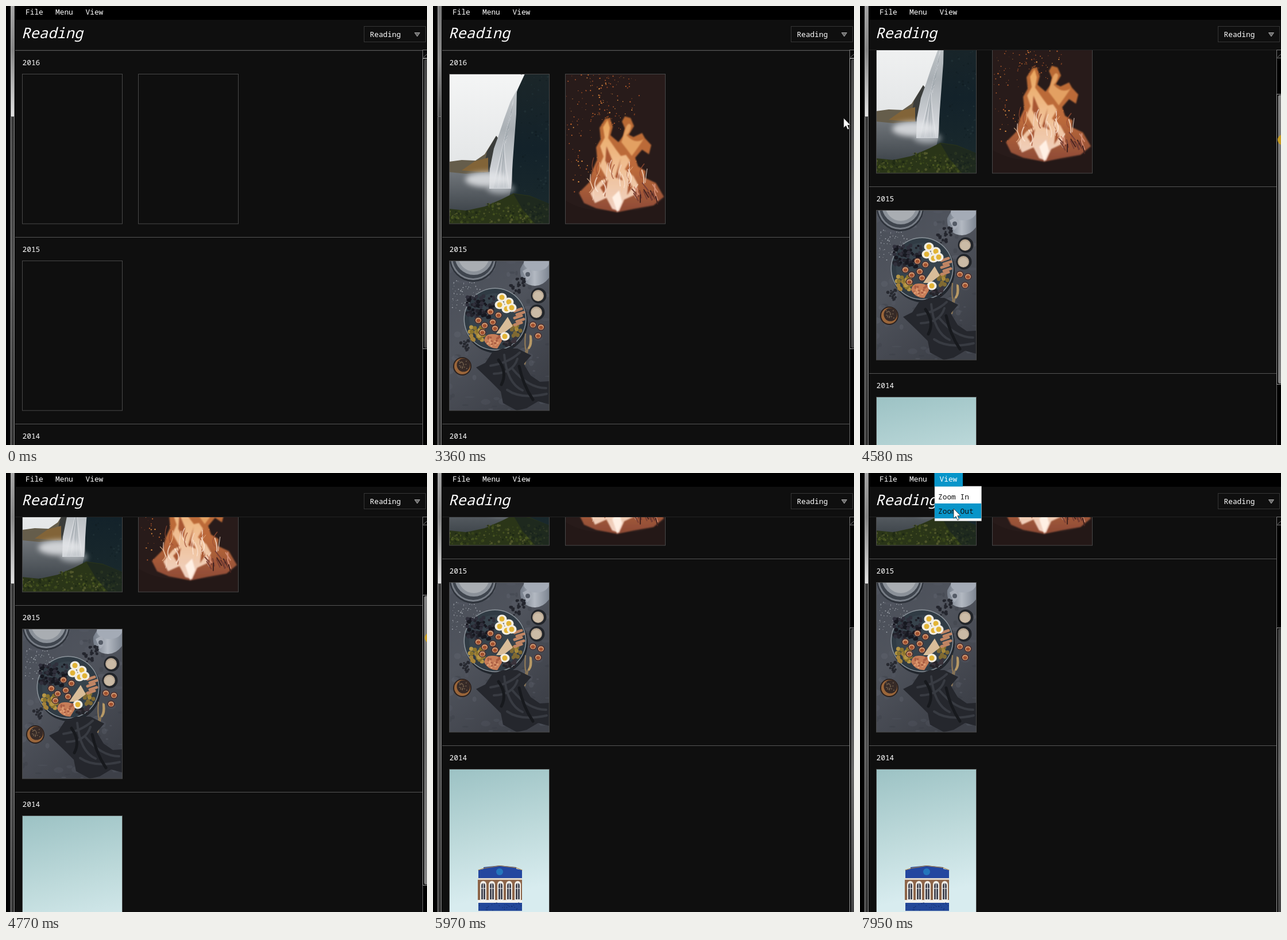
These frames come from a looping animation (733x764 px, 8 s). An HTML page:

```html
<!DOCTYPE html>
<html lang="en">
<head>
<meta charset="utf-8">
<title>Reading list</title>
<style>
  html, body { margin: 0; width: 100%; height: 100%; overflow: hidden; background: #000; }
  svg { display: block; width: 733px; height: 764px; }
  text { font: 12.83px "Noto Sans Mono", "DejaVu Sans Mono", monospace; fill: #fff; white-space: pre; }
  .title { font-size: 25.5px; font-style: italic; }
  .dark { fill: #111; }
</style>
</head>
<body>
<svg viewBox="0 0 733 764" xmlns="http://www.w3.org/2000/svg">
  <defs>
    <clipPath id="pane"><rect x="16" y="77" width="709" height="687"/></clipPath>
    <clipPath id="photo"><rect width="174" height="261"/></clipPath>
    <linearGradient id="sky" x2="0" y2="1"><stop stop-color="#f4f5f5"/><stop offset="1" stop-color="#d9dcde"/></linearGradient>
    <linearGradient id="cliff" x2="0" y2="1"><stop stop-color="#1b2629"/><stop offset=".5" stop-color="#13222a"/><stop offset="1" stop-color="#1b2a2d"/></linearGradient>
    <linearGradient id="lake" x2="0" y2="1"><stop stop-color="#72777c"/><stop offset="1" stop-color="#30373d"/></linearGradient>
    <linearGradient id="fall" x2="0" y2="1"><stop stop-color="#c5cacd"/><stop offset=".4" stop-color="#a9afb4"/><stop offset="1" stop-color="#dfe1e5"/></linearGradient>
    <linearGradient id="flame" x2="0" y2="1"><stop stop-color="#b96a33"/><stop offset=".55" stop-color="#bd6b3b"/><stop offset="1" stop-color="#8d4a36"/></linearGradient>
    <linearGradient id="core" x2="0" y2="1"><stop stop-color="#f0ad61"/><stop offset="1" stop-color="#fbe2d5"/></linearGradient>
    <linearGradient id="slate" x2=".6" y2="1"><stop stop-color="#4a4f59"/><stop offset=".45" stop-color="#50545d"/><stop offset="1" stop-color="#3d4048"/></linearGradient>
    <linearGradient id="jug"><stop stop-color="#737b87"/><stop offset=".5" stop-color="#b3b9c2"/><stop offset="1" stop-color="#7e8692"/></linearGradient>
    <linearGradient id="air" x2=".15" y2="1"><stop stop-color="#9cc2c4"/><stop offset=".5" stop-color="#bedadb"/><stop offset=".9" stop-color="#d8ecef"/></linearGradient>
    <linearGradient id="railLit" x2="0" y2="1"><stop stop-color="#a6a6a6"/><stop offset=".4" stop-color="#858585"/><stop offset="1" stop-color="#e2e2e2"/></linearGradient>
    <linearGradient id="railDim" x2="0" y2="1"><stop stop-color="#777"/><stop offset=".5" stop-color="#8a8a8a"/><stop offset="1" stop-color="#4c4c4c"/></linearGradient>
    <linearGradient id="railLow" x2="0" y2="1"><stop stop-color="#555"/><stop offset=".2" stop-color="#353535"/><stop offset=".62" stop-color="#505050"/><stop offset="1" stop-color="#333"/></linearGradient>
    <linearGradient id="thumbIdle" x2="0" y2="1"><stop stop-color="#444"/><stop offset=".5" stop-color="#686868"/><stop offset="1" stop-color="#444"/></linearGradient>
    <linearGradient id="thumbHot" x2="0" y2="1"><stop stop-color="#848484"/><stop offset=".5" stop-color="#6c6c6c"/><stop offset="1" stop-color="#848484"/></linearGradient>
    <filter id="soft" x="-50%" y="-50%" width="200%" height="200%"><feGaussianBlur stdDeviation="5"/></filter>
    <filter id="blur1"><feGaussianBlur stdDeviation="1"/></filter>
  </defs>

  <rect width="733" height="764" fill="#000"/>
  <rect x="16" y="24" width="717" height="740" fill="#0f0f0f"/>

  <g id="rail">
    <rect x="8" y="0" width="7" height="764" fill="url(#railLow)"/>
    <path d="M8.5 0V764" stroke="#aaa"/>
    <path d="M14.5 0V764" stroke="#858585"/>
    <rect id="railThumb" x="9" y="0" width="5" height="192"/>
    <path d="M8 192.5H15" stroke="#777"/>
  </g>

  <path d="M16 76.5H725" stroke="#232323"/>
  <g clip-path="url(#pane)"><g id="list"></g></g>

  <text x="34" y="15">File</text>
  <text x="86" y="15">Menu</text>
  <text class="title" x="27" y="56">Reading</text>
  <rect x="623.5" y="35.5" width="107" height="27" fill="#0f0f0f" stroke="#363636"/>
  <text x="633.5" y="54">Reading</text>
  <path d="M711.5 46.5H720.5L716 53Z" fill="#666" stroke="#aaa"/>

  <g id="scrollbar">
    <rect x="725" y="76" width="8" height="688" fill="#000"/>
    <path d="M725.5 76V764" stroke="#686868"/>
    <path d="M733 76.5H725.5V90.5H733" fill="#0b0b0b" stroke="#777"/>
    <path d="M727 89L734 83" stroke="#777" fill="none"/>
    <g id="thumb">
      <path d="M734 91.5H725.5V596.5H734" fill="#0a0a0a" stroke="#999"/>
      <rect id="grip" x="728" y="93" width="14" height="502" rx="3"/>
    </g>
  </g>

  <g id="menu">
    <rect x="130" y="23" width="81.5" height="60.5" fill="#fff" stroke="#999" stroke-width=".6"/>
    <rect id="hover" x="130" width="81" height="26" fill="#0895c9"/>
    <text class="dark" x="136" y="46">Zoom In</text>
    <text class="dark" x="136" y="71">Zoom Out</text>
  </g>
  <rect id="viewBg" x="129.5" y="0" width="49.5" height="23.5" fill="#0895c9"/>
  <text x="138.5" y="15">View</text>

  <circle id="press" r="9" fill="#c79d25"/>
  <path id="arrow" d="M0 0V17L4 13.4L6.8 20L9.6 18.8L6.9 12.4H12Z" fill="#fff" stroke="#222" stroke-width=".8"/>
</svg>
<script>
const LOOP = 8000;
const $ = id => document.getElementById(id);

let seed = 7;
const rnd = (a = 0, b = 1) => {
  seed = (seed * 16807) % 2147483647;
  return a + (b - a) * seed / 2147483647;
};
const n = v => v.toFixed(1);
const path = (d, fill, extra = "") => `<path d="${d}" fill="${fill}" ${extra}/>`;
const disc = (x, y, r, fill, extra = "") => `<circle cx="${n(x)}" cy="${n(y)}" r="${n(r)}" fill="${fill}" ${extra}/>`;
const oval = (x, y, rx, ry, fill, extra = "") => `<ellipse cx="${x}" cy="${y}" rx="${rx}" ry="${ry}" fill="${fill}" ${extra}/>`;
const box = (x, y, w, h, fill) => `<rect x="${x}" y="${y}" width="${w}" height="${h}" fill="${fill}"/>`;
const many = (count, make) => Array.from({ length: count }, (_, i) => make(i)).join("");
const pick = list => list[Math.floor(rnd(0, list.length))];
const line = (d, stroke, w, extra = "") => path(d, "none", `stroke="${stroke}" stroke-width="${w}" stroke-linecap="round" ${extra}`);

function waterfall() {
  const grass = "M0 235L30 238L62 231L92 218L112 208L140 212L174 226V261H0Z";
  return box(0, 0, 174, 261, "url(#sky)")
    + path("M0 153L22 150L46 151L62 140L72 124L82 108L90 118V185H0Z", "#655d4b")
    + path("M66 135L82 108L90 118V175H58Z", "#3b3d3b")
    + path("M22 168L45 152L68 146V172Z", "#826438")
    + path("M0 171L30 174L110 168V261H0Z", "url(#lake)")
    + path("M132 0H174V261H95L110 190V60L119 28Z", "url(#cliff)")
    + many(70, () => disc(rnd(122, 174), rnd(0, 210), rnd(.6, 2), pick(["#101c21", "#25353a"]), 'opacity=".6"'))
    + path("M118 28L107 48L96 78L87 105L78 130L71 165L70 200H108L111 150L114 110L117 70Z", "url(#fall)")
    + many(26, i => line(`M${n(112 - i * .5)} ${n(45 + i * 3)}Q${n(98 - i * .3)} 110 ${n(75 + i * 1.2)} 198`, pick(["#eef0f2", "#8f989f"]), .8, 'opacity=".4"'))
    + oval(66, 184, 38, 13, "#e2e4e7", 'filter="url(#soft)" opacity=".85"')
    + oval(90, 200, 24, 9, "#c2c7cc", 'filter="url(#soft)" opacity=".7"')
    + path(grass, "#2a3518")
    + many(190, () => {
        const x = rnd(0, 174);
        return disc(x, rnd(x < 60 ? 239 : 226, 259), rnd(.8, 2.6), pick(["#4c5a22", "#1b2613", "#39471b", "#5c6130"]), 'opacity=".75"');
      })
    + path("M112 209L140 213L174 226V261H150L128 236Z", "#152024", 'opacity=".55"');
}

function fire() {
  const ember = ["#c7672d", "#e79445", "#8d4524", "#a8552c"];
  return box(0, 0, 174, 261, "#281b1a")
    + many(150, () => disc(rnd(0, 1) * rnd(60, 145), rnd(0, 215), rnd(.4, 1.2), pick(ember)))
    + many(70, () => disc(rnd(35, 118), rnd(0, 90), rnd(.4, 1.2), pick(ember)))
    + path("M0 220Q25 236 60 238H125Q160 232 174 216V261H0Z", "#241817")
    + path("M24 207L42 189L48 167L56 149L54 128L62 114L60 94L70 78L78 77L83 92L79 107L93 119L101 108L104 95L99 83L104 74L114 77L120 91L111 106L119 110L134 103L139 112L150 124L146 140L134 132L122 146L127 161L140 169L139 181L158 190L172 214L154 229L120 235L91 241L54 234L33 225Z", "url(#flame)", 'filter="url(#blur1)"')
    + path("M106 93Q111 83 115 90Q114 101 107 107Q123 124 137 113Q126 130 116 143L108 132L98 119Z", "#e3a062", 'filter="url(#blur1)"')
    + path("M66 93L74 80L78 94L75 112L88 131L97 143L106 141L113 151L104 166L119 178L127 193L120 211L103 219L94 239L82 235L72 216L52 225L44 208L60 188L72 181L60 160L67 144L61 126L69 111Z", "url(#core)", 'filter="url(#blur1)" opacity=".9"')
    + path("M72 126L82 150L79 168L70 151ZM97 147L92 171L101 186L87 180ZM61 198L75 184L68 209ZM111 184L117 197L108 211Z", "#a85631", 'filter="url(#blur1)"')
    + many(28, () => {
        const x = rnd(40, 142), y = rnd(170, 220);
        return line(`M${n(x)} ${n(y)}q${n(rnd(-12, 12))} -9 ${n(rnd(-6, 6))} -24`, pick(["#ffe9da", "#f4c79e", "#9f5136", "#f7d8c6"]), rnd(.8, 2.6).toFixed(1), 'opacity=".7"');
      })
    + many(18, () => {
        const x = rnd(124, 164), y = rnd(200, 227);
        return line(`M${n(x)} ${n(y)}l${n(rnd(-12, 2))} -13`, pick(["#44231f", "#d18a70", "#7b4035"]), 2);
      })
    + path("M82 215L91 241L99 222L94 203Z", "#fff0e4", 'filter="url(#blur1)"');
}

const cup = (x, y) => disc(x, y, 13.5, "#22252a") + disc(x - 1, y, 10, "#baa893") + disc(x - 1, y + 1, 8, "#cbbba6");
const fig = (x, y) => oval(x, y, 6.5, 6, "#4b2b2c") + oval(x, y, 5, 4.5, "#d2a078") + oval(x, y + .5, 3.5, 3, "#a2502f");
const egg = (x, y) => oval(x, y, 8.5, 7.5, "#f3eee2") + disc(x, y, 4.5, "#e2b436");

function breakfast() {
  const figs = [[51, 104], [62, 113], [76, 107], [58, 125], [86, 95], [72, 89], [80, 118], [160, 116], [155, 131], [146, 112]];
  const eggs = [[92, 64], [104, 72], [88, 77], [100, 84], [97, 132], [109, 82]];
  return box(0, 0, 174, 261, "url(#slate)")
    + many(110, () => oval(n(rnd(0, 174)), n(rnd(0, 261)), n(rnd(2, 9)), n(rnd(1, 6)), pick(["#6a707a", "#343840", "#5b606a"]), 'opacity=".25"'))
    + many(70, () => disc(rnd(5, 55), rnd(35, 90), rnd(.4, 1), "#9ba0a8"))
    + disc(42, -4, 41, "#2e333b") + disc(42, -5, 39, "#777d86") + disc(42, -5, 36, "#3f454e")
    + disc(43, -8, 33, "#8b9199") + disc(43, -8, 27, "#a9adb2")
    + path("M124 14Q130 3 134 -2H174V30Q160 49 139 42Q122 35 124 14Z", "url(#jug)")
    + oval(152, 4, 22, 14, "#a4abb6") + path("M128 18L139 12L144 27L136 35Z", "#a7adb7")
    + disc(137, 24, 4, "#555c67")
    + many(22, () => disc(rnd(106, 132), rnd(31, 58), rnd(1.5, 3), "#24262e"))
    + cup(156, 61) + cup(153, 90)
    + disc(82, 106, 55, "#22272e") + disc(80, 102, 54.5, "#8c949b") + disc(80, 102, 53, "#303b44") + disc(80, 102, 45, "#37434c")
    + many(75, () => disc(rnd(31, 79), rnd(62, 99), rnd(2, 3.6), pick(["#23232c", "#30303c", "#171820"])))
    + many(22, () => disc(rnd(35, 60), rnd(116, 138), 3.6, pick(["#a4823a", "#8b752d", "#b69746"])))
    + many(12, () => disc(rnd(108, 125), rnd(112, 134), 3.6, pick(["#a78838", "#806a32"])))
    + many(25, () => disc(rnd(90, 118), rnd(134, 148), 2.5, pick(["#25242a", "#3a333b"])))
    + path("M82 127L102 98L111 114L94 127Z", "#d9bd99")
    + many(5, i => line(`M${114 + i % 2 * 4} ${88 + i * 6}l12 -4`, pick(["#a95c43", "#c08564"]), 5))
    + figs.map(p => fig(...p)).join("") + eggs.map(p => egg(...p)).join("")
    + path("M61 139Q63 127 75 128Q90 127 92 140L84 153Q68 153 61 139Z", "#c77d58")
    + many(24, () => disc(rnd(66, 88), rnd(131, 150), 2, pick(["#dd9a70", "#a95d43"])))
    + line("M141 130Q142 148 137 154L132 180M133 128Q131 148 134 156L129 178", "#8c7757", 2.4)
    + line("M142 132Q144 146 139 152", "#b89a66", 4)
    + many(14, () => disc(rnd(19, 36), rnd(139, 158), rnd(1.5, 2.8), "#272930"))
    + path("M47 186L63 178L75 160L93 153L119 153L143 165L130 180L142 200L158 211L174 210V250L155 245L135 257L118 261L94 248L90 228L70 208Z", "#25272d")
    + line("M72 183Q104 178 123 160M78 197Q111 196 119 171M96 164Q101 214 128 226M101 225Q125 242 170 232M110 188Q138 222 169 222", "#383b42", 4)
    + line("M86 173Q102 195 91 216M122 184Q129 217 146 242", "#17191d", 5)
    + disc(23, 184, 16, "#2b211e") + disc(23, 184, 14, "#9b663a") + disc(25, 182, 11.5, "#362a27")
    + many(18, () => disc(rnd(17, 31), rnd(175, 189), 1, "#72604e"));
}

function facade() {
  const arch = i => {
    const x = 54 + i * 15;
    return path(`M${x} 229V201a5.5 6 0 0 1 11 0V229Z`, "#efece6")
      + path(`M${x + 2} 227V203a3.5 4 0 0 1 7 0V227Z`, "#454753")
      + line(`M${x + 5.5} 198V228M${x + 1} 208H${x + 10}`, "#eee", 1);
  };
  return box(0, 0, 174, 261, "url(#air)")
    + path("M51 191V176L60 174V171L88 168L117 171V174L127 176V191Z", "#24479f")
    + line("M51 176L60 173L88 168.5L117 172L127 176", "#b5833e", 1)
    + disc(88, 179, 6, "#2476bc")
    + box(50, 190, 77, 4, "#e0d9cc") + box(50, 193, 77, 36, "#8d6549")
    + many(5, arch)
    + box(50, 228, 77, 5, "#f0f1ee") + box(51, 233, 76, 15, "#234899")
    + many(30, () => disc(rnd(52, 126), rnd(233, 246), .8, "#16306f"))
    + box(50, 247, 77, 14, "#dce5e6");
}

const frame = (x, y, art) => `<g transform="translate(${x} ${y})">
  <g class="art" clip-path="url(#photo)">${art}</g>
  <rect x=".5" y=".5" width="174" height="260.5" fill="none" stroke="#484848"/></g>`;

const years = [[2016, waterfall, fire], [2015, breakfast], [2014, facade]];
$("list").innerHTML = years.map(([year, ...arts], row) => {
  const top = 77 + row * 325.2;
  return `<path d="M16 ${Math.round(top) + .5}H725" stroke="#555"/>
    <text x="28.5" y="${Math.round(top) + 26}">${year}</text>`
    + arts.map((art, col) => frame(28 + col * 202, Math.round(top) + 41, art())).join("");
}).join("");
const arts = document.querySelectorAll(".art");

// Each key holds until the next one: [time, ...values]
const hold = (keys, t) => keys.reduce((last, k) => t >= k[0] ? k : last, keys[0]);
const scrollKeys = [[0, 0], [4240, 9], [4350, 28], [4470, 58], [4580, 88], [4670, 128], [4770, 172], [4910, 222], [5020, 253]];
const AWAY = [-60, -60];
const cursorKeys = [
  [0, ...AWAY], [1840, 697, 761], [1940, ...AWAY],
  [3150, 715, 195], [3470, ...AWAY],
  [4120, 727, 158], [4240, 728, 165], [4350, 731, 179], [4470, 734, 203], [4580, 736, 233], [4670, 737, 256],
  [4770, 738, 287], [4910, 738, 322], [5020, 738, 344], [5650, ...AWAY],
  [6300, 650, 330], [6410, 580, 240], [6520, 500, 160], [6630, 415, 95], [6740, 335, 50], [6850, 263, 16], [6960, ...AWAY],
  [7080, 200, 1], [7200, 172, 6], [7310, 158, 9], [7420, 154, 10], [7630, 156, 18], [7740, 159, 30], [7890, 161, 45], [7950, 163, 62]
];
const between = (t, a, b) => t >= a && t < b;
const show = (el, on) => el.setAttribute("visibility", on ? "visible" : "hidden");
const move = (el, x, y) => el.setAttribute("transform", `translate(${x} ${y})`);

function draw(t) {
  const scroll = hold(scrollKeys, t)[1];
  const [, x, y] = hold(cursorKeys, t);
  move($("list"), 0, -scroll);
  move($("thumb"), 0, Math.round(scroll * .704));
  arts.forEach(a => show(a, t >= 1680));
  $("railThumb").setAttribute("fill", between(t, 740, 4120) ? "url(#railDim)" : "url(#railLit)");
  $("grip").setAttribute("fill", between(t, 3790, 5770) ? "url(#thumbHot)" : "url(#thumbIdle)");
  move($("arrow"), x, y);
  move($("press"), x, y);
  show($("press"), between(t, 4120, 5650));
  show($("viewBg"), t >= 7200);
  show($("menu"), t >= 7520);
  show($("hover"), t >= 7890);
  $("hover").setAttribute("y", t >= 7950 ? 53 : 28);
}

function tick() {
  draw(performance.now() % LOOP);
  requestAnimationFrame(tick);
}
tick();
</script>
</body>
</html>
```
